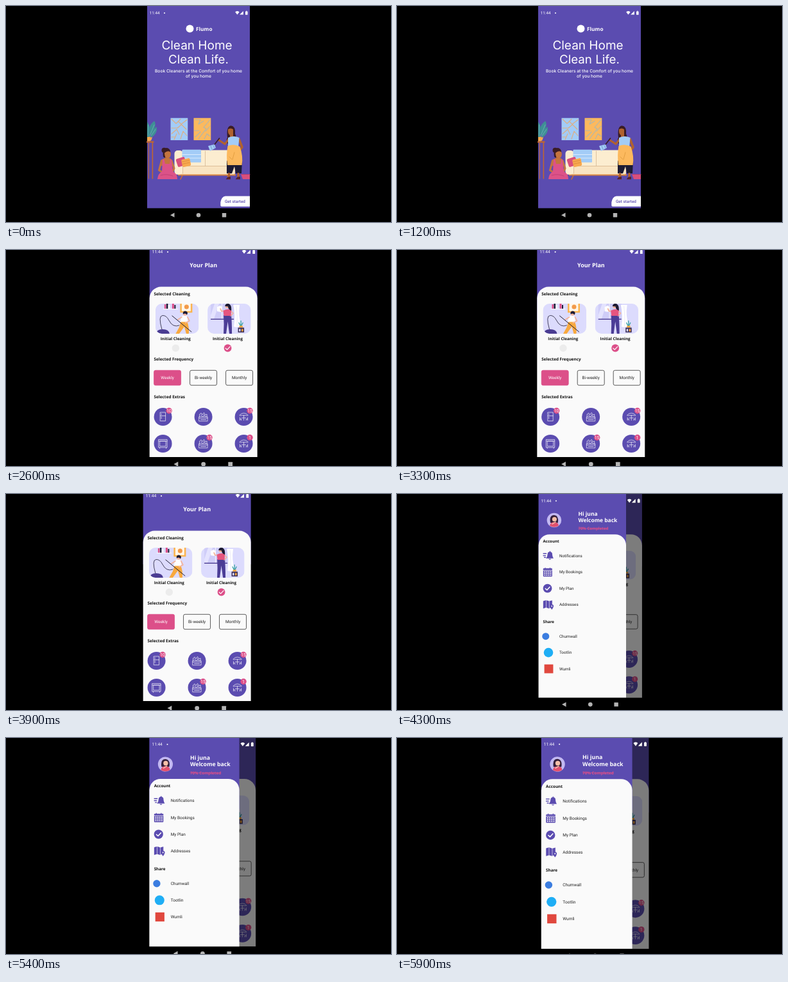
Write an HTML page that moves like this. It is 600 by 338 pixels and loops after 6000 ms.

```html
<!DOCTYPE html>
<html lang="en">
<head>
<meta charset="utf-8">
<title>Cleaning app walkthrough</title>
<style>
  html, body { margin: 0; width: 100%; height: 100%; overflow: hidden; background: #000; }
  svg { display: block; width: 100%; height: 100%; }
  text { text-rendering: geometricPrecision; white-space: pre; }
  .inter { font-family: Inter, sans-serif; }
  .medium { font-family: Inter, sans-serif; font-weight: 500; }
  .head { font-family: "Open Sans", sans-serif; font-weight: 700; }
  .body { font-family: Roboto, sans-serif; }
  .bold { font-family: Roboto, sans-serif; font-weight: 500; }
</style>
</head>
<body>
<svg id="stage" viewBox="0 0 600 338"></svg>
<script>
const PURPLE = '#5b4cb0', PINK = '#dc4f89', PAPER = '#fafafa', INK = '#1d1b33', LAVENDER = '#dcdbfd';
const SKY = '#a3ccf7', AMBER = '#fcb95e', SKIN = '#b0622f', HAIR = '#3a1c25';

const rect = (x, y, w, h, fill, r = 0, extra = '') =>
  `<rect x="${x}" y="${y}" width="${w}" height="${h}" rx="${r}" fill="${fill}" ${extra}/>`;
const circle = (x, y, r, fill) => `<circle cx="${x}" cy="${y}" r="${r}" fill="${fill}"/>`;
const shape = (d, fill) => `<path d="${d}" fill="${fill}"/>`;
const line = (d, stroke, width = 1) =>
  `<path d="${d}" fill="none" stroke="${stroke}" stroke-width="${width}" stroke-linecap="round" stroke-linejoin="round"/>`;
const text = (x, y, size, str, cls, fill, anchor = 'start', extra = '') =>
  `<text x="${x}" y="${y}" font-size="${size}" class="${cls}" fill="${fill}" text-anchor="${anchor}" ${extra}>${str}</text>`;
const group = (content, transform = '', id = '') => `<g id="${id}" transform="${transform}">${content}</g>`;
const move = (x, y, content) => group(content, `translate(${x} ${y})`);

// Panel with two rounded top corners
const panel = (left, top, right, bottom, r) =>
  shape(`M${left} ${bottom}V${top + r}a${r} ${r} 0 0 1 ${r} ${-r}H${right - r}a${r} ${r} 0 0 1 ${r} ${r}V${bottom}Z`, PAPER);

// Status bar and navigation keys, laid out for a phone whose left edge is x = 220
const chrome = (scale = 1, left = 220, dy = 0) => group(
  text(223.8, 13.2, 6.3, '11:44', 'body', '#fff') + circle(247, 11, 1, '#fff') +
  shape('M357.2 9.4Q360.4 6.6 363.6 9.4L360.4 13.6Z', '#fff') +
  shape('M369.8 8V13.6H364.2Z', '#fff') +
  rect(373, 8.4, 3.6, 5.4, '#fff', .6) + rect(374, 7.7, 1.6, 1, '#fff') +
  shape('M262.5 323.6V330.8L256 327.2Z', '#b4b4b4') + circle(300, 327.2, 3.3, '#b4b4b4') +
  rect(336.8, 324, 6.4, 6.4, '#b4b4b4', .4),
  `translate(${left - 220 * scale} ${dy}) scale(${scale})`);

const wallArt = () =>
  rect(256.5, 175.3, 26.8, 34.7, SKY) + rect(292.5, 175.3, 26.8, 34.7, AMBER) +
  line('M258 177L265 184L272 177M269 181L281 193M282 178L273 185M258 191H267L273 186M258 200L266 193L270 201M262 209L266 200M272 208L276 196L282 203M258 205H264', '#dfad80', 1.1) +
  line('M295 178H303L300 185L308 180M318 178L308 190L312 192L300 208M294 195H301M295 205L303 197M318 188L311 196M309 208L313 200L318 204', '#a9b6b4', 1.1);

const plant = () =>
  rect(219, 211.5, 11.5, 2.4, '#c0662f') + line('M228.4 214V270', '#c0662f', 1.6) + line('M222.3 214V270', '#c0662f', 1.2) +
  shape('M220 204.5H228Q227 211.5 223.5 211.5H220Z', '#f5a94e') +
  shape('M220 181Q227 190 223 205H220ZM223 205Q220 188 231 180Q236 186 227 198ZM225 205Q227 192 235 189Q236 201 226 206Z', '#3f8f95') +
  line('M221 204L221.5 186M224 203L231 186M226 203L233 193', '#7cc3c5', .6);

const sofa = () =>
  line('M275 265L272 271M345 265L348 271', '#c86e33', 1.6) + rect(268, 263, 90, 2.6, '#d9863f', 1) +
  rect(274, 225.5, 75, 30, '#fcedd0', 3) + rect(263, 250, 94, 13.5, '#f9e4c2', 2) +
  rect(262.5, 226, 13, 37.5, '#fcedd0', 5) +
  line('M310.5 227V250M275 250.5H346M275.5 232V262', '#c9a57e', .6) +
  rect(274.5, 224.7, 29.5, 20, SKY, 1) + line('M275 232.5H303.5M275 238H303.5', '#dcecfd', 1.2) +
  group(rect(266, 237.5, 14, 13, '#d94f7c', 2), 'rotate(-18 273 244)') +
  group(rect(274, 239, 13.5, 12, '#f7a94e', 2) + line('M275 242.5H286M275 246H286', '#d9823a', .7), 'rotate(-12 281 245)');

const sittingWoman = () =>
  circle(246.5, 225.8, 4, HAIR) + shape('M245 236Q243 222 251 222Q258 224 256 234Q250 240 245 236Z', HAIR) +
  rect(248, 234, 5, 7, SKIN) + shape('M247 230Q252 225 256.5 229Q258 236 253 238.5Q247 238 247 230Z', '#c4743f') +
  shape('M243 240Q250 236 257 239L260 250H242Z', '#c4743f') +
  line('M242.5 242L238.5 257L247 262M258 242L262 254L258 262', '#c4743f', 3) +
  shape('M244 240H246.5L248 247H255L256 240H258L260 259Q267 262 267 271H236Q237 262 243 259Z', '#dc5288') +
  line('M241 265Q250 262 260 266', '#b43c70', .7);

const standingWoman = () =>
  shape('M345 206Q343 188 350.5 187.3Q358 188 357 200Q361 208 358 216H346Q342 211 345 206Z', HAIR) +
  shape('M346 193Q350 190 354 193L354 206H349V202Q345.5 201 346 193Z', SKIN) +
  line('M347.5 208L341 216L332 210', SKIN, 3.2) + line('M363 208L368 221L362 229', SKIN, 3.6) +
  shape('M346 206Q355 202 363.5 206L362 222H346Z', SKY) +
  shape('M344 242H368L367 262H358L356 251L352 262H344Z', INK) +
  shape('M345.5 219Q355 215 364.5 220Q370 236 367.5 249H345Q343 233 345.5 219Z', AMBER) + line('M356 229L353 240M348 236L352 240', '#d89435', .7) +
  line('M347.5 262.5V267M362 262.5V267', SKIN, 3.4) +
  shape('M343 271.3Q344 267 350 267V271.3ZM358 271.3Q359 267 365 267V271.3Z', '#57232e') +
  line('M332.5 207L324 218', HAIR, 1.6) + shape('M315 219L325 216.5L327 222L318 227Z', SKY) + line('M319 219L321 224M323 218L325 222', '#5f86b8', .7) +
  shape('M366 263H380V271H369Z', '#d94f7c') + line('M366 263.5H380', '#b43c70', 1);

const home = () =>
  rect(220, 0, 160, 316.4, PURPLE) +
  circle(286.5, 35.5, 6, '#fff') + text(296, 38.6, 8.2, 'Flumo', 'head', '#fff') +
  text(297.5, 67.6, 19, 'Clean Home', 'inter', '#fff', 'middle') +
  text(300, 89.6, 18.7, 'Clean Life.', 'inter', '#fff', 'middle') +
  text(300, 104, 6.7, 'Book Cleaners at the Comfort of you home', 'medium', '#fff', 'middle') +
  text(300, 111.6, 6.7, 'of you home', 'medium', '#fff', 'middle') +
  wallArt() + plant() + sofa() + sittingWoman() + standingWoman() +
  shape('M380 297.5H342Q336 298 334.3 307V312Q334.3 313.7 336 313.7H380Z', '#fff') +
  text(341, 308, 6.4, 'Get started', 'bold', PURPLE) + chrome();

// Card pictures use a local 67.5 x 47 space
const vacuuming = () =>
  rect(12, 7.8, 23, 1, '#fff') + rect(14, 1, 2.5, 6.8, PINK) + rect(17, 0, 2.5, 7.8, INK) +
  rect(20, 2, 2.5, 5.8, '#fff') + rect(26, 0, 3, 7.8, PINK) + rect(29.5, 2, 2, 5.8, INK) +
  rect(38.5, 0, 19, 14, '#fbb44e') + rect(41, 0, 14, 11.7, '#fff6e8') + circle(48.5, 5, 3.5, '#f29a4a') +
  line('M10 40Q4 19 11 18.5Q17 18 21 26Q27 38 37 34', INK, .8) +
  shape('M1 47Q2 40 11 40Q21 40 22 47Z', '#4a3c92') +
  shape('M40 27H49Q53 36 52 47H48L45 36L37 47H31.5L37 37Z', '#f8a93f') +
  shape('M40 20Q45 17 50 20L50 28.5H39Z', '#fff') + line('M41 21L35 25M50 21L53 27L47 30', '#f3b49c', 1.7) +
  line('M26 19L56 44', INK, 1) +
  circle(46, 16, 2.7, '#f3b49c') + shape('M43 16.5Q42 11.5 47 11.5Q52 13 49 17.5Q47 14 43 16.5Z', INK);

const windowWiping = () =>
  rect(5, 0, 36, 24, '#cfcdf8') + shape('M11 0H18L10 24H5V18Z', '#e4e3fe') + rect(22, 0, .8, 24, '#fff') +
  shape('M40 2H50Q47 20 53 35Q46 38 41 36Q44 18 40 2Z', '#fff') + line('M45 4Q47 20 46 35', '#e2e0f5', .7) +
  rect(5, 23.6, 36, 1.4, '#4a3c92') +
  shape('M25 18H37Q38 30 38 47H34L31.5 28L29 47H25Q26 32 25 18Z', '#4b3d96') +
  shape('M15 5L20 3L23 6L21 13L15 12Z', '#fff') + line('M26 11L22 12L20 8M36 11L40 15L36 19', '#f3b49c', 1.7) +
  shape('M24.5 11Q31 7 37 10L36.5 19H25.5Z', '#e5557f') + circle(30.5, 4.5, 2.8, '#f3b49c') +
  shape('M27 4Q28 -1 33 0Q38 2 37 11Q32 9 32 4.5Z', INK) +
  line('M52 36L49 30M52 36L52 27M52 36L55 30', '#3aa0a8', 1.4) +
  rect(49.5, 34.5, 5.5, 3, '#f8a93f', .5) + rect(47.5, 37.5, 9.5, 7.5, '#3a2e57') +
  rect(49, 39.5, 2.5, 4, LAVENDER) + rect(53, 39.5, 2.5, 4, '#f8a93f');

const card = (x, picture, label) => move(x, 84,
  `<g clip-path="url(#card)">${rect(0, 0, 67.5, 47, LAVENDER)}${picture}</g>`) +
  text(x + 31.4, 141, 6.25, label, 'head', '#111', 'middle');

const choice = (x, label, chosen) =>
  rect(x, 188.3, 42, 23.4, chosen ? PINK : PAPER, 2.5, `stroke="${chosen ? PINK : '#333'}" stroke-width=".8"`) +
  text(x + 21, 202.3, 6.5, label, 'body', chosen ? '#fff' : '#222', 'middle');

// Line icons are centred on 0,0
const icons = {
  fridge: 'M-4 -7H4V6.5H-4ZM-4 -1.5H4M-2.5 -5V-3M-2.5 0V3',
  basket: 'M-6.5 0H6.5V6.8H-6.5ZM-6.5 2.2H6.5M-4 4.5H4M-6 0V-4L-3.5 -6L-2 -3L1 -6.5L3 -3L5.5 -4V0M-4 -3L-1 0L2 -3M0 -4L4 0',
  parasol: 'M-6.5 -2.5Q-5 -5.5 0 -5.8Q5 -5.5 6.5 -2.5ZM0 -2.5V5.5M-3.2 1.8H3.2M-6 1V5.5M6 1V5.5M-6 3.5H-3.8V5.5M6 3.5H3.8V5.5',
  oven: 'M-6.5 -6.5H6.5V6H-6.5ZM-4.5 -4H4.5V4H-4.5ZM-6.5 -4H6.5M-5 6V7.5M5 6V7.5'
};
const extra = (x, y, icon, count) => move(x, y,
  circle(0, 0, 14, PURPLE) + line(icons[icon], '#fff', .65) +
  (count ? circle(9.5, -9.5, 4.7, PINK) + text(9.4, -6.9, 7, count, 'body', '#fff', 'middle') : ''));

const plan = () =>
  rect(228.3, -20, 168, 130, PURPLE) + panel(228.3, 57.6, 396.3, 324, 18) +
  text(312.4, 27, 9, 'Your Plan', 'head', '#fff', 'middle') +
  text(235.2, 71.2, 6.4, 'Selected Cleaning', 'head', '#111') +
  card(237.5, vacuuming(), 'Initial Cleaning') + card(318.7, windowWiping(), 'Initial Cleaning') +
  circle(269, 153.5, 5.7, '#ececec') + circle(350.2, 153.5, 5.9, PINK) +
  line('M346.7 153.6L349.2 156L353.8 151.2', '#fff', 1.1) +
  text(235.2, 172.8, 6.36, 'Selected Frequency', 'head', '#111') +
  choice(235.2, 'Weekly', true) + choice(291.2, 'Bi-weekly') + choice(347.2, 'Monthly') +
  text(235.2, 231.8, 6.4, 'Selected Extras', 'head', '#111') +
  extra(249.2, 261, 'fridge', 10) + extra(312.2, 261, 'basket') + extra(375.2, 261, 'parasol', 15) +
  extra(249.2, 303, 'oven') + extra(312.2, 303, 'basket', 15) + extra(375.2, 303, 'parasol', 1) +
  chrome(1.05, 228.3, -8.45);

const avatar = () => move(246.5, 41,
  circle(0, 0, 11.4, '#c3b9f2') + shape('M-6 4Q-8 -8 0 -8Q8 -7 6 4Z', '#35203a') +
  circle(.5, -1.5, 3.6, '#f6bfa8') + shape('M-7 9Q-6 3 0 3Q7 3 7 9Q0 13 -7 9Z', '#e2506f') +
  line('M-3 6L2 3', '#f6bfa8', 1.6));

const bell = () => line('M229.5 94H234M229.5 97.2H233M231 100H233', PURPLE, 1.4) +
  shape('M233.5 101.5Q236 99 236 95.5Q236 91.5 239.5 91V90H240.5V91Q244 92 243.6 96Q244 99.5 245.5 101.5ZM237.5 102.4H241.7Q240 105 237.5 102.4Z', PURPLE);

const calendar = () => {
  let dots = '';
  for (let row = 0; row < 3; row++)
    for (let col = 0; col < 4; col++) dots += rect(230.8 + col * 3.1, 121.8 + row * 2.7, 1.9, 1.6, PAPER);
  return rect(229.2, 117.3, 14.2, 13, PURPLE, 1) + rect(229.2, 120, 14.2, .7, PAPER) +
    line('M232.5 116.8V118.5M240 116.8V118.5', PURPLE, 1.4) + dots;
};

const tick = () => circle(236, 149, 7, PURPLE) + line('M232.7 149.3L235.2 151.6L239.6 146.8', '#fff', 1.5);

const map = () =>
  shape('M229.2 169L233.5 167.8V179.6L229.2 181ZM234.1 167.8L238.4 169.2V181L234.1 179.6ZM239 169.2L243.4 168V177L239 181Z', PURPLE) +
  shape('M240 177.3A2.7 2.7 0 0 1 245.6 177.3Q245.4 180 242.8 182.8Q240.2 180 240 177.3Z', PURPLE) + circle(242.8, 177.3, 1, PAPER);

const drawerItems = [
  [99.4, 'Notifications', bell()], [125.4, 'My Bookings', calendar()],
  [151.3, 'My Plan', tick()], [177.2, 'Addresses', map()],
  [227.2, 'Chumwall', circle(233.2, 225, 5.6, '#3b7de0')],
  [253, 'Tootlin', circle(237.5, 250.7, 7.4, '#1faef5')],
  [278.9, 'Wumli', rect(231, 269.5, 14, 14, '#e0483e')]
];

const drawer = () =>
  group(plan(), 'translate(.23 7.66) scale(.9714)') +
  rect(222, -20, 164, 342, '#000', 0, 'opacity=".5"') + rect(222, 322, 164, 30, '#000') +
  rect(222, -20, 138, 130, PURPLE) + panel(222, 63.6, 360, 322, 17) + avatar() +
  text(284.5, 33.6, 8.6, 'Hi juna', 'head', '#fff') + text(284.5, 44.2, 8.6, 'Welcome back', 'head', '#fff') +
  text(284.5, 56.5, 6.15, '70% Completed', 'head', PINK, 'start', 'text-decoration="line-through"') +
  text(229, 76.5, 6.2, 'Account', 'head', '#111') + text(229, 204.1, 6.2, 'Share', 'head', '#111') +
  drawerItems.map(([y, label, icon]) => icon + text(254.6, y, 6.4, label, 'body', '#222')).join('') +
  chrome(1.02, 222, -.76);

const stage = document.getElementById('stage');
stage.innerHTML = `<defs><clipPath id="card">${rect(0, 0, 67.5, 47, '#000', 10)}</clipPath></defs>` +
  group(home(), '', 'home') + group(plan(), '', 'plan') + group(drawer(), '', 'drawer');
const scenes = ['home', 'plan', 'drawer'].map(id => document.getElementById(id));

function render(ms) {
  const time = Math.floor(ms % 6000 / 100) / 10;   // ten pictures per second
  const current = Math.floor(time / 2), local = time - current * 2;
  scenes.forEach((scene, i) => scene.setAttribute('display', i === current ? 'inline' : 'none'));
  if (current === 1) scenes[1].setAttribute('transform', `translate(${-7.7 * local} 0)`);
  if (current === 2) {
    const zoom = (1 + .025 * local) / 1.02;
    scenes[2].setAttribute('transform', `translate(116 38) scale(${zoom}) translate(-116 -38)`);
  }
}

function animate() {
  render(performance.now());
  requestAnimationFrame(animate);
}
animate();
</script>
</body>
</html>
```
